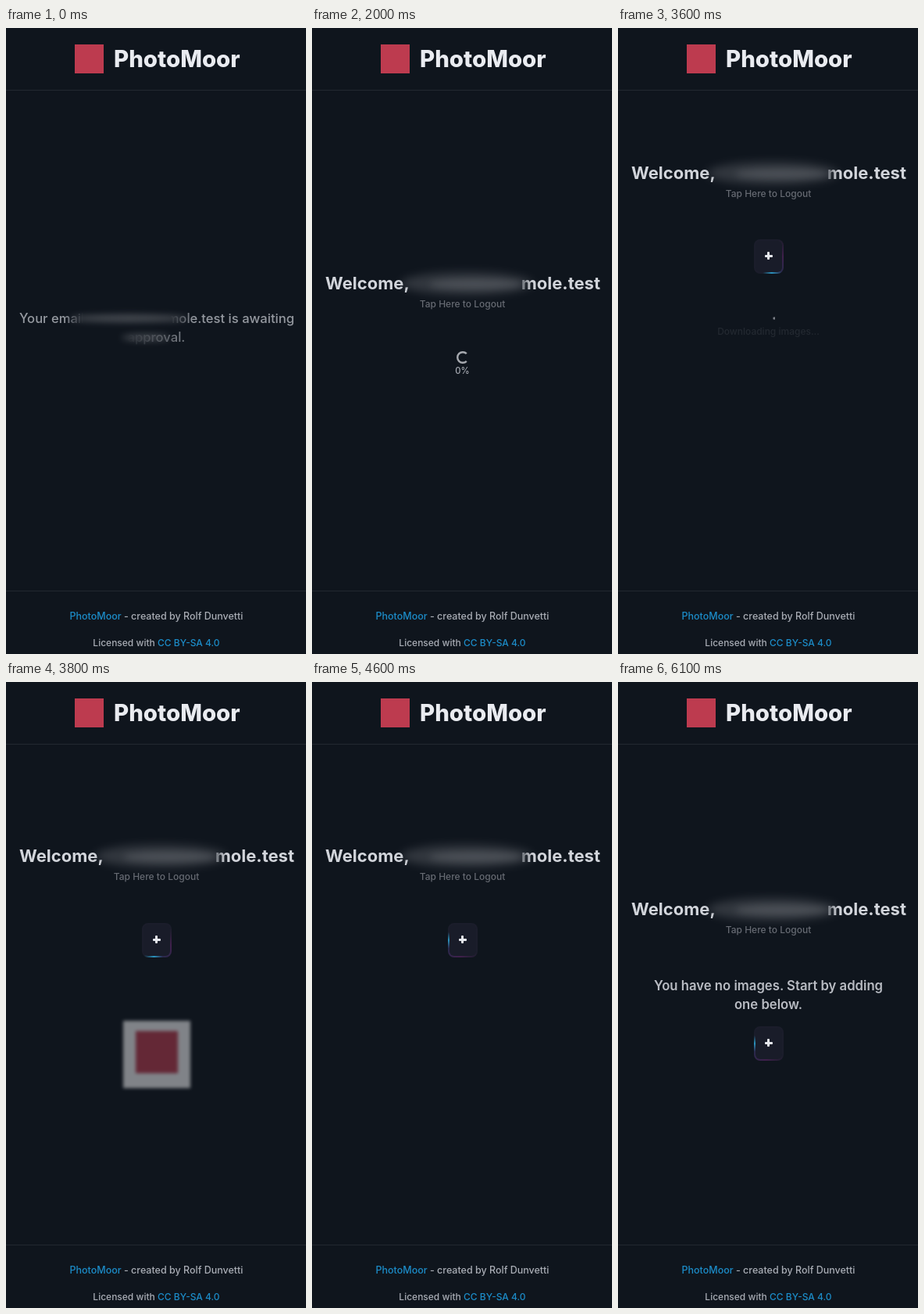
Animation of 384 by 800 pixels, one loop 6200 ms. Source, as an HTML page:

```html
<!DOCTYPE html>
<html lang="en">
<head>
<meta charset="utf-8">
<title>PhotoMoor</title>
<style>
  html, body { margin: 0; width: 100%; height: 100%; overflow: hidden; background: #0f151d; }
  #stage {
    position: relative; width: 384px; height: 800px; overflow: hidden;
    background: #0f151d; color: #a9adb5; font: 500 12px/20px Inter, sans-serif;
  }
  #stage div, #stage svg { position: absolute; }
  #stage .line { left: 0; width: 385px; text-align: center; white-space: nowrap; }
  #stage .left { text-align: left; left: 17px; }
  #stage .right { text-align: right; width: 369px; }
  .rule { left: 0; width: 384px; height: 1px; background: #222830; }
  .logo { left: 88px; top: 21px; width: 37px; height: 37px; background: #bd3b4f; }
  #stage .title { left: 138px; top: 30px; font-size: 29.4px; font-weight: 800; color: #e9ebf0; white-space: nowrap; }
  .credit { font-size: 12.5px; }
  .link { color: #1c8cc8; }
  .body { font-size: 16.7px; font-weight: 600; color: #b9bcc3; }
  .wait { font-size: 16.6px; font-weight: 500; color: #9599a0; }
  .hello { font-size: 22px; font-weight: 700; color: #d2d5db; }
  .dim { color: #666a72; }
  .smear { border-radius: 50%; }
  #user { left: 0; top: 0; }
  #add {
    left: 174px; width: 38px; height: 44px; margin-top: -22px; border-radius: 8px;
    background: conic-gradient(from calc(var(--a) - 330deg), #1b1d2b 0 190deg, #40204c 250deg,
      #2a294c 300deg, #2a94be 330deg, #1b1d2b 360deg);
  }
  #add::before { content: ""; position: absolute; inset: 2px; border-radius: 6px; background: #191c29; }
  #add i { position: absolute; background: #e6e8ee; border-radius: 1px; }
  #add .h { left: 13.5px; top: 19.5px; width: 10px; height: 3px; }
  #add .v { left: 17px; top: 16px; width: 3px; height: 10px; }
  #spin { left: 0; top: 0; }
  #spin svg { left: 182.5px; top: -10px; }
  #note { top: 7px; font-size: 11.2px; }
  #photo {
    left: 150px; top: 210.5px; width: 86px; height: 86px; background: #f1f1f3; filter: blur(2px);
  }
  #photo div { left: 16px; top: 13px; width: 54px; height: 54px; background: #b83c50; }
</style>
</head>
<body>
<div id="stage">
  <div class="logo"></div>
  <div class="title">PhotoMoor</div>
  <div class="rule" style="top:79px"></div>

  <div id="wait">
    <div class="line left wait" style="top:361px;-webkit-mask-image:linear-gradient(90deg,#000 58px,transparent 82px)">Your email</div>
    <div class="line right wait" style="top:361px;-webkit-mask-image:linear-gradient(90deg,transparent 210px,#000 240px)">mole.test is awaiting</div>
    <div class="line wait" style="top:385px;opacity:.75;-webkit-mask-image:linear-gradient(90deg,transparent 155px,#000 220px)">approval.</div>
    <div class="smear" style="left:82px;top:366px;width:150px;height:10px;background:#6b6e74;opacity:.6;filter:blur(4px)"></div>
    <div class="smear" style="left:148px;top:391px;width:62px;height:9px;background:#62656b;opacity:.6;filter:blur(4px)"></div>
  </div>

  <div id="user">
    <div class="line left hello" style="top:-10px">Welcome,</div>
    <div class="line right hello" style="top:-10px;-webkit-mask-image:linear-gradient(90deg,transparent 258px,#000 280px)">mole.test</div>
    <div class="smear" style="left:114px;top:-14px;width:168px;height:29px;background:#777a80;opacity:.34;filter:blur(6px)"></div>
    <div class="smear" style="left:150px;top:-5px;width:118px;height:13px;background:#8b8e94;opacity:.28;filter:blur(5px)"></div>
    <div class="line dim" style="top:17px">Tap Here to Logout</div>
    <div id="empty">
      <div class="line body" style="top:88px">You have no images. Start by adding</div>
      <div class="line body" style="top:112px">one below.</div>
    </div>
    <div id="add"><i class="h"></i><i class="v"></i></div>
    <div id="spin">
      <svg width="20" height="20" viewBox="-10 -10 20 20">
        <circle id="arc" r="6.8" fill="none" stroke="#a7aab0" stroke-width="2.4" pathLength="360"/>
      </svg>
      <div id="note" class="line"></div>
    </div>
    <div id="photo"><div></div></div>
  </div>

  <div class="rule" style="top:719px"></div>
  <div class="line credit" style="top:742px"><span class="link">PhotoMoor</span> - created by Rolf Dunvetti</div>
  <div class="line" style="top:776px">Licensed with <span class="link">CC BY-SA 4.0</span></div>
</div>
<script>
const LOOP = 6200, STEP = 100;

// y: heading position; add, spin: offsets below it; glow: highlight angle at time 0
const scenes = [
  { at: 0, wait: true },
  { at: 500, y: 290, empty: true, add: 172, glow: -65 },
  { at: 1800, y: 326, spin: 95 },
  { at: 3600, y: 185, add: 107, spin: 186, glow: -190 },
  { at: 3800, y: 222, add: 108, photo: true, glow: -190 },
  { at: 5300, y: 290, empty: true, add: 172, glow: -340 }
];

const $ = id => document.getElementById(id);
const el = {};
for (const id of ['wait', 'user', 'empty', 'add', 'spin', 'arc', 'note', 'photo']) el[id] = $(id);

const ramp = (t, a, b) => Math.min(1, Math.max(0, (t - a) / (b - a)));
const show = (id, on) => { el[id].style.display = on ? 'block' : 'none'; };

function drawArc(start, sweep) {
  el.arc.setAttribute('stroke-dasharray', `${sweep} ${360 - sweep}`);
  el.arc.setAttribute('transform', `rotate(${start})`);
}

function drawSpinner(t, scene) {
  el.spin.style.transform = `translateY(${scene.spin}px)`;
  const loading = !!scene.add;
  el.arc.style.opacity = loading ? 0.75 : 1;
  el.note.style.opacity = loading ? 0.12 + (t - scene.at) / 800 : 1;
  el.note.style.fontSize = loading ? '12px' : '';
  if (loading) {
    drawArc(-12, 24 + (t - scene.at) * 0.3);
    el.note.textContent = 'Downloading images...';
  } else {
    drawArc(45 + (t - 2000) * 0.36, 270);
    el.note.textContent = Math.round(100 * ramp(t, 2100, 3400)) + '%';
  }
}

function render(t) {
  const scene = scenes.filter(s => s.at <= t).pop();
  show('wait', scene.wait);
  show('user', !scene.wait);
  show('empty', scene.empty);
  show('add', scene.add);
  show('spin', scene.spin);
  show('photo', scene.photo);
  if (scene.wait) return;

  el.user.style.transform = `translateY(${scene.y}px)`;
  if (scene.add) {
    el.add.style.top = scene.add + 'px';
    el.add.style.setProperty('--a', scene.glow + t * 0.1 + 'deg');
  }
  if (scene.spin) drawSpinner(t, scene);
  el.photo.style.opacity = ramp(t, 3700, 3900) * (1 - ramp(t, 4200, 4500));
}

function tick() {
  const t = performance.now() % LOOP;
  render(Math.floor(t / STEP) * STEP);
  requestAnimationFrame(tick);
}
tick();
</script>
</body>
</html>
```
